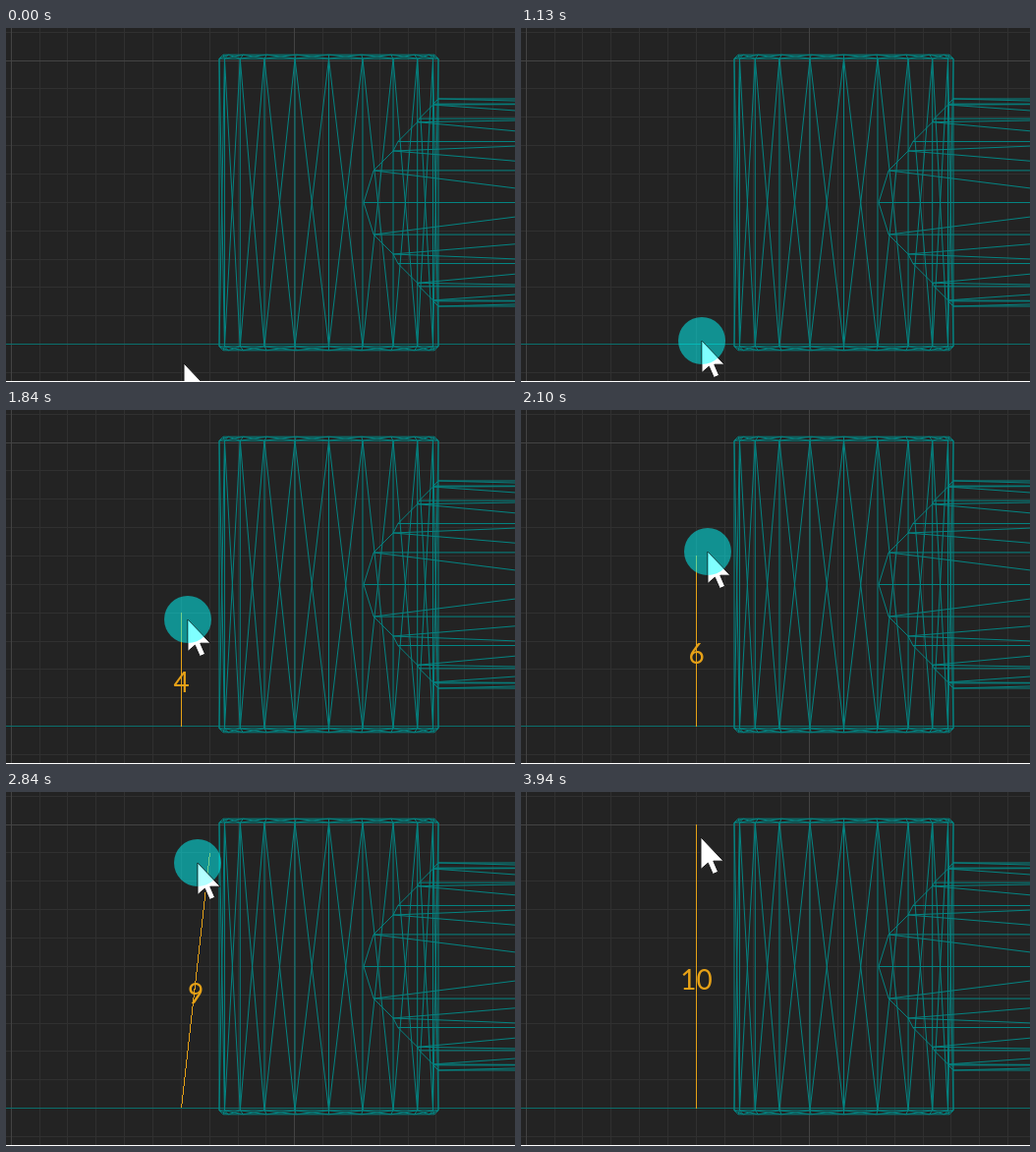
Write an HTML page that moves like this. It is 518 by 360 pixels and loops after 3.96 s.

```html
<!DOCTYPE html>
<html lang="en">
<head>
<meta charset="utf-8">
<title>Measuring a part</title>
<style>
  html, body { margin: 0; width: 100%; height: 100%; overflow: hidden; background: #232323; }
  svg { display: block; width: 518px; height: 360px; }
  .lines { fill: none; stroke-width: 1; }
  .crisp { shape-rendering: crispEdges; }
  text { font: 28px Lato, sans-serif; fill: #e6a117; text-anchor: middle; }
</style>
</head>
<body>
<svg viewBox="0 0 518 360">
  <defs>
    <path id="arrow" d="M0 0V32.5L7.3 26.2L12.3 37.5L17.6 35.2L12.8 24.2H23Z"/>
    <clipPath id="spot"><circle r="24"/></clipPath>
  </defs>
  <g class="lines crisp">
    <path id="minor" stroke="#303030"/>
    <path id="major" stroke="#434343"/>
    <path d="M0 321.5H518" stroke="#0b6e6c"/>
  </g>
  <path id="mesh" class="lines" stroke="#048482"/>
  <path id="measure" class="lines crisp" stroke="#e6a117"/>
  <text id="label"></text>
  <g id="pointer">
    <circle id="touch" r="24" fill="#0ff" fill-opacity=".5"/>
    <use href="#arrow" fill="#fff" stroke="#181818"/>
    <g id="tint" clip-path="url(#spot)"><use href="#arrow" fill="#0ff"/></g>
  </g>
  <rect y="359" width="518" height="1" fill="#fff"/>
</svg>
<script>
const $ = id => document.getElementById(id);
const LOOP = 3960, UNIT = 28.85, ORIGIN = { x: 178.5, y: 321.5 };
const CENTER = { x: 328.5, y: 177.5 };
const HEAD = 111.5, RIM = 107.5, SHAFT = 105.5, SHAFT_END = 635;
const STEP = Math.PI / 10;
const seg = (x1, y1, x2, y2) => `M${x1} ${y1}L${x2} ${y2}`;
const pixel = v => Math.floor(v) + 0.5;

function drawGrid() {
  const lines = { minor: '', major: '' };
  for (let i = 0; i < 18; i++) {
    const x = pixel(5.2 + i * UNIT);
    lines[i % 10 ? 'minor' : 'major'] += seg(x, 0, x, 360);
  }
  for (let i = -1; i < 12; i++) {
    const y = pixel(321.6 - i * UNIT);
    lines[i % 10 ? 'minor' : 'major'] += seg(0, y, 518, y);
  }
  $('minor').setAttribute('d', lines.minor);
  $('major').setAttribute('d', lines.major);
}

// Both parts are 20-sided cylinders
const corner = (radius, k) => [radius * Math.cos(k * STEP), radius * Math.sin(k * STEP)];

// Half-width of a 20-sided polygon at a given depth
function chord(radius, depth) {
  const k = Math.min(4, Math.floor(Math.asin(Math.min(1, depth / radius)) / STEP));
  const [x1, z1] = corner(radius, k), [x2, z2] = corner(radius, k + 1);
  return depth <= z2 ? x1 + (x2 - x1) * (depth - z1) / (z2 - z1) : chordNext(radius, k + 1, depth);
}
function chordNext(radius, k, depth) {
  const [x1, z1] = corner(radius, k), [x2, z2] = corner(radius, k + 1);
  return x1 + (x2 - x1) * (depth - z1) / (z2 - z1);
}

function headPath() {
  let d = '';
  for (let k = 0; k <= 10; k++) {
    const x = CENTER.x - corner(HEAD, k)[0], rim = CENTER.x - corner(RIM, k)[0];
    const next = CENTER.x - corner(HEAD, k + 1)[0], nextRim = CENTER.x - corner(RIM, k + 1)[0];
    d += seg(x, CENTER.y - 146.3, x, CENTER.y + 146.3);
    for (const side of [-1, 1]) {
      const edge = CENTER.y + side * 146.3, cap = CENTER.y + side * 150.3;
      d += seg(x, edge, rim, cap);
      if (k === 10) continue;
      d += seg(x, edge, next, edge) + seg(rim, cap, nextRim, cap);
      d += seg(x, edge, nextRim, cap) + seg(rim, cap, next, edge);
      d += seg(x, edge, next, 2 * CENTER.y - edge);
    }
  }
  return d;
}

// The shaft pierces the head; facets run from the seam to the far end
function shaftPath() {
  const seam = [], facets = [];
  for (let k = 0; k <= 5; k++) {
    const [depth, y] = corner(SHAFT, k);
    seam.push([CENTER.x + chord(HEAD, depth), y]);
    facets.push([k, k]);
    if (k < 1 || k > 3) continue;
    const [x, z] = corner(HEAD, 4 - k);
    seam.push([CENTER.x + x, chord(SHAFT, z)]);
    facets.push([k, k + 1]);
  }
  facets[1].push(0);
  facets[facets.length - 1].push(4);

  let d = '';
  for (const side of [-1, 1]) {
    const at = y => CENTER.y + side * y;
    d += 'M' + seam.map(([x, y]) => `${x} ${at(y)}`).join('L');
    seam.forEach(([x, y], i) => {
      for (const k of new Set(facets[i])) d += seg(x, at(y), SHAFT_END, at(corner(SHAFT, k)[1]));
    });
  }
  return d;
}

const progress = (t, from, to) => Math.min(1, Math.max(0, (t - from) / (to - from)));
const linear = p => p;
const easeOut = p => 1 - (1 - p) ** 1.42;
const easeIn = p => p ** 1.3;
const smooth = p => p * p * (3 - 2 * p);

const MOVES = [
  { from: 20, to: 430, dx: 4, dy: -14 },
  { from: 620, to: 860, dx: -1, dy: -9 },
  { from: 1330, to: 1480, dx: -2, dy: -23 },
  { from: 1580, to: 2490, dx: 17, dy: -215, easeX: easeIn, easeY: easeOut },
  { from: 2690, to: 3180, dx: -16, dy: -34, easeX: smooth, easeY: smooth },
];

function pointerAt(t) {
  let x = 181, y = 341;
  for (const { from, to, dx, dy, easeX = linear, easeY = linear } of MOVES) {
    const p = progress(t, from, to);
    x += dx * easeX(p);
    y += dy * easeY(p);
  }
  return [Math.round(x), Math.round(y)];
}

function render(t) {
  const [x, y] = pointerAt(t);
  const pressed = t >= 1130 && t < 3940;
  $('pointer').setAttribute('transform', `translate(${x} ${y})`);
  $('touch').setAttribute('visibility', pressed ? 'visible' : 'hidden');
  $('tint').setAttribute('opacity', pressed ? 0.5 - 0.3 * progress(t, 2100, 3180) : 0);

  // The measured end snaps to the grid
  const col = Math.round((x - ORIGIN.x) / UNIT), row = Math.round((ORIGIN.y - y) / UNIT);
  const measuring = t >= 1580 && row > 0;
  const endX = pixel(ORIGIN.x + col * UNIT), endY = ORIGIN.y - row * UNIT;
  $('measure').setAttribute('d', measuring ? seg(ORIGIN.x, ORIGIN.y, endX, endY) : '');
  $('label').textContent = measuring ? Math.round(Math.hypot(col, row)) : '';
  $('label').setAttribute('x', (ORIGIN.x + endX) / 2);
  $('label').setAttribute('y', (ORIGIN.y + endY) / 2 + 23.5);
}

drawGrid();
$('mesh').setAttribute('d', headPath() + shaftPath());
const start = performance.now();
function tick() {
  render((performance.now() - start) % LOOP);
  requestAnimationFrame(tick);
}
tick();
</script>
</body>
</html>
```
